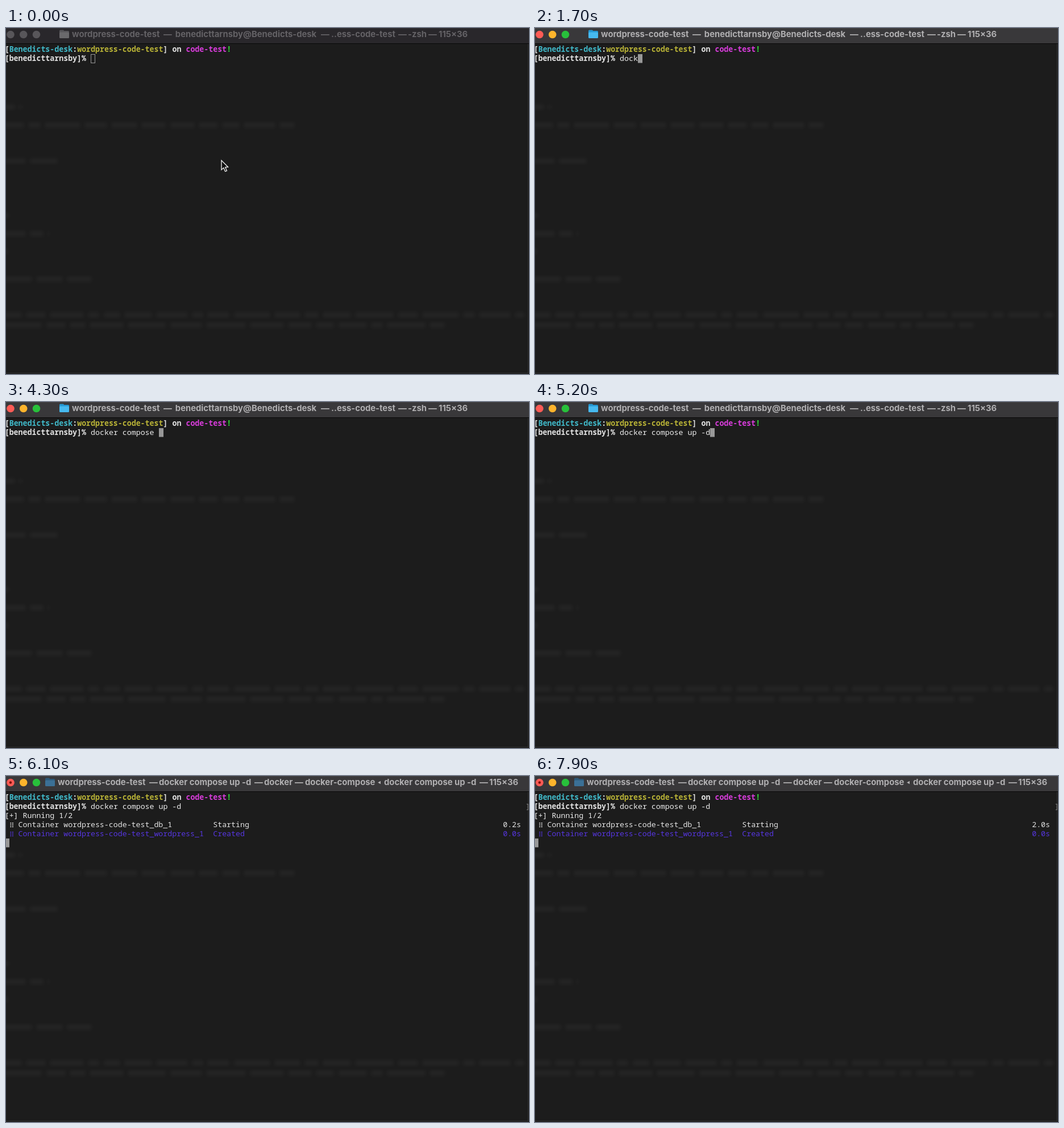
An HTML page with a canvas that plays this animation: 920 by 609 pixels, repeating every 8 s.

```html
<!DOCTYPE html>
<html lang="en">
<head>
<meta charset="utf-8">
<title>Terminal</title>
<style>
  html, body { margin: 0; width: 100%; height: 100%; overflow: hidden; background: #1c1c1c; }
  canvas { display: block; }
</style>
</head>
<body>
<canvas id="stage" width="920" height="609"></canvas>
<script>
const W = 920, H = 609, LOOP = 8000;
const ctx = document.getElementById('stage').getContext('2d');

const CELL = 7.968, LEFT = -2.3, ROW = 16, BASELINE = 42;
const MONO = '13.28px "Noto Sans Mono", "DejaVu Sans Mono", monospace';
const TITLE_FONT = '700 14.8px Inter, "Liberation Sans", sans-serif';
const WHITE = '#e2e2e2', CYAN = '#40b9c9', YELLOW = '#b8b236';
const MAGENTA = '#d83cdb', GREEN = '#2fd435', VIOLET = '#5636e0';

const USER = 'benedicttarnsby', HOST = 'Benedicts-desk';
const FOLDER = 'wordpress-code-test', COMMAND = 'docker compose up -d';

const FOCUS_AT = 200, HIDE_POINTER_AT = 600, ENTER_AT = 5800, OUTPUT_AT = 5900;
// Time at which each character of COMMAND appears
const KEYS = [600, 900, 1100, 1700, 1900, 2000, 2100, 2300, 2400, 2600,
              2800, 3000, 3900, 4100, 4300, 4500, 4700, 4800, 5000, 5200];

const IDLE_TITLE = [
  [116, FOLDER], [277, '—'], [554, '—'], [572, '..ess-code-test'],
  [690, '—'], [707, '-zsh'], [743, '—'], [761, '115×36']
];
const BUSY_TITLE = [
  [91, FOLDER], [252, '—'], [269, COMMAND], [437, '—'], [454, 'docker'], [508, '—'],
  [526, 'docker-compose'], [665, COMMAND], [833, '—'], [850, '115×36']
];

const colX = col => LEFT + col * CELL;

function rect(x, y, w, h, color) {
  ctx.fillStyle = color;
  ctx.fillRect(x, y, w, h);
}

function disc(x, y, r, color) {
  ctx.fillStyle = color;
  ctx.beginPath();
  ctx.arc(x, y, r, 0, Math.PI * 2);
  ctx.fill();
}

function shape(points, color) {
  ctx.fillStyle = color;
  ctx.beginPath();
  points.forEach(([x, y]) => ctx.lineTo(x, y));
  ctx.closePath();
  ctx.fill();
}

function mono(row, col, text, color = WHITE, weight = 500) {
  ctx.font = `${weight} ${MONO}`;
  ctx.fillStyle = color;
  ctx.fillText(text, colX(col), BASELINE + row * ROW);
}

// Faint blurred text showing through the translucent window
function makeBackdrop() {
  const layer = document.createElement('canvas');
  layer.width = W;
  layer.height = H;
  const g = layer.getContext('2d');
  g.fillStyle = '#1c1c1c';
  g.fillRect(0, 0, W, H);
  g.filter = 'blur(3px)';
  g.fillStyle = 'rgba(255,255,255,0.035)';
  let seed = 11;
  const random = () => (seed = seed * 16807 % 2147483647) / 2147483647;
  const lines = [[139, 28], [171, 510], [234, 92], [330, 5], [362, 77],
                 [393, 4], [442, 156], [505, 912], [523, 772]];
  for (const [y, end] of lines) {
    for (let x = -4; x < end;) {
      const word = Math.min(20 + random() * 50, end - x);
      g.fillRect(x, y - 5, word, 10);
      x += word + 7;
    }
  }
  return layer;
}
const backdrop = makeBackdrop();

function drawFolder(x, back, front) {
  ctx.fillStyle = back;
  ctx.beginPath();
  ctx.roundRect(x, 3.5, 8, 6, 1.5);
  ctx.roundRect(x, 5, 17, 12, 1.5);
  ctx.fill();
  ctx.fillStyle = front;
  ctx.beginPath();
  ctx.roundRect(x, 7.5, 17, 10.5, 1.5);
  ctx.fill();
}

function drawTitleBar(focused, busy) {
  rect(0, 0, W, 27, focused ? '#39383a' : '#29272b');
  rect(0, 0, W, 1, focused ? '#434244' : '#333135');
  rect(0, 27, W, 1, '#080808');

  const lights = focused ? ['#fd5b55', '#fdb42c', '#28c03b'] : Array(3).fill('#58565a');
  lights.forEach((color, i) => disc(8 + i * 22.75, 11.5, 6.8, color));
  if (busy) disc(8, 11.5, 2.2, '#7d110c');

  if (busy) drawFolder(69, '#2c5878', '#3b7096');
  else if (focused) drawFolder(94, '#2497d2', '#46b9ef');
  else drawFolder(94, '#57565a', '#6a696c');

  ctx.font = TITLE_FONT;
  ctx.fillStyle = focused ? '#b0afb1' : '#646266';
  (busy ? BUSY_TITLE : IDLE_TITLE).forEach(([x, text]) => ctx.fillText(text, x, 16.2));
  if (busy) {
    shape([[654, 11.5], [659, 8.8], [659, 14.2]], '#b0afb1');
  } else {
    ctx.textAlign = 'center';
    ctx.fillText(`${USER}@${HOST}`, 422, 16.2);
    ctx.textAlign = 'left';
  }
}

function drawPrompt(typed) {
  const runs = [['[', WHITE], [HOST, CYAN], [':', WHITE], [FOLDER, YELLOW],
                ['] on ', WHITE], ['code-test', MAGENTA], ['!', GREEN]];
  let col = 0;
  for (const [text, color] of runs) {
    mono(0, col, text, color, 700);
    col += text.length;
  }
  mono(1, 0, `[${USER}]%`, WHITE, 700);
  mono(1, 19, COMMAND.slice(0, typed), '#ececec');
}

function drawCursor(row, col, solid) {
  const x = Math.round(colX(col)), y = 46 + (row - 1) * ROW;
  if (solid) {
    rect(x, y, 8, 15.5, '#989898');
  } else {
    ctx.strokeStyle = '#989898';
    ctx.lineWidth = 1;
    ctx.strokeRect(x + 0.5, y + 0.5, 7, 15);
  }
}

function drawSpinner(row, color) {
  const y = 34 + row * ROW;
  for (let i = 0; i < 6; i++) {
    rect(7.5 + (i % 2) * 3.5, y + Math.floor(i / 2) * 3.2, 1.8, 1.8, color);
  }
}

function drawContainer(row, name, state, seconds, color) {
  drawSpinner(row, color);
  mono(row, 3, `Container ${FOLDER}_${name}`, color);
  mono(row, 46, state, color);
  mono(row, 110, `${seconds.toFixed(1)}s`, color);
}

function drawPointer(t) {
  const k = Math.min(t / 400, 1);
  ctx.save();
  ctx.translate(379 - 6 * k, 233 - 8 * k);
  ctx.beginPath();
  [[0, 0], [0, 16.5], [3.8, 13], [6.6, 19.5], [9.4, 18.3], [6.7, 12], [11.6, 11.7]]
    .forEach(([x, y]) => ctx.lineTo(x, y));
  ctx.closePath();
  ctx.fillStyle = '#111';
  ctx.fill();
  ctx.strokeStyle = '#f4f4f4';
  ctx.lineWidth = 1.3;
  ctx.stroke();
  ctx.restore();
}

function drawEdges() {
  rect(918, 28, 1, H - 29, '#353535');
  rect(919, 0, 1, H, '#121212');
  rect(0, 607, 919, 1, '#353535');
  rect(0, 608, W, 1, '#121212');
}

function draw(t) {
  const focused = t >= FOCUS_AT, entered = t >= ENTER_AT, busy = t >= OUTPUT_AT;
  const typed = KEYS.filter(at => at <= t).length;

  ctx.drawImage(backdrop, 0, 0);
  drawEdges();
  drawTitleBar(focused, busy);
  drawPrompt(typed);

  if (entered) mono(1, 115, ']', '#858585', 400);
  if (busy) {
    mono(2, 0, '[+] Running 1/2', '#ececec');
    drawContainer(3, 'db_1', 'Starting', (t - OUTPUT_AT) / 1000, WHITE);
    drawContainer(4, 'wordpress_1', 'Created', 0, VIOLET);
  }

  if (busy) drawCursor(5, 0, true);
  else if (entered) drawCursor(2, 0, true);
  else drawCursor(1, 19 + typed, focused);

  if (t < HIDE_POINTER_AT) drawPointer(t);
}

function tick() {
  const t = performance.now() % LOOP;
  draw(Math.floor(t / 100) * 100);
  requestAnimationFrame(tick);
}
tick();
</script>
</body>
</html>
```
